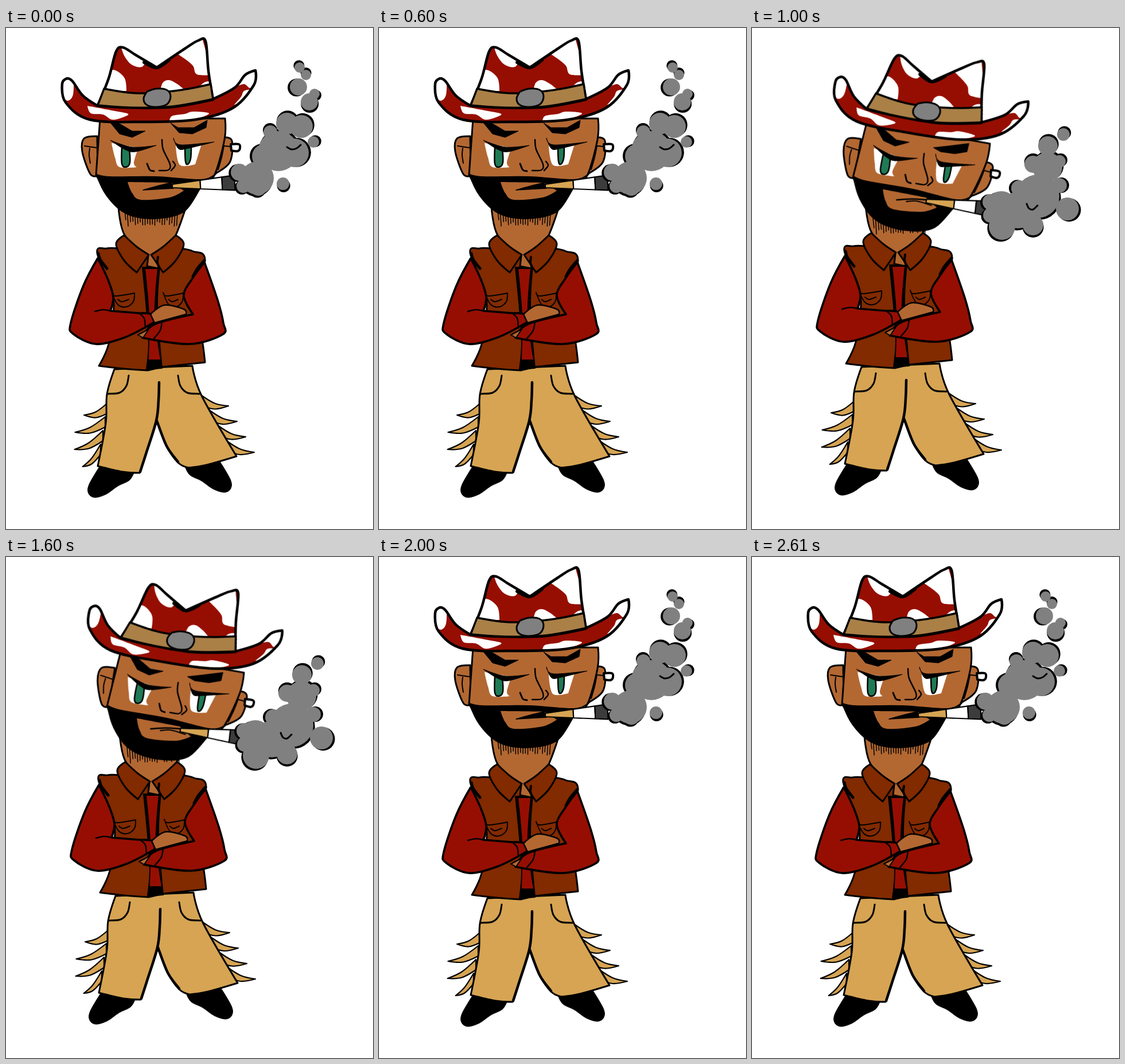
These frames come from a looping animation (640 by 875 pixels, 3010 ms). An HTML page:

```html
<!DOCTYPE html>
<html lang="en">
<head>
<meta charset="utf-8">
<title>Smoking cowboy</title>
<style>
  html, body { margin: 0; width: 100%; height: 100%; overflow: hidden; background: #fff; }
  svg { display: block; width: 100%; height: 100%; }
</style>
</head>
<body>
<svg id="stage" viewBox="0 0 640 875"></svg>
<script>
const NS = 'http://www.w3.org/2000/svg';
const INK = '#000', RED = '#960e02', VEST = '#822a00', SKIN = '#b36832', TAN = '#d6a453',
      BAND = '#aa8047', GREY = '#808080', GREEN = '#1f7a55', ASH = '#3c3c3c', WHITE = '#fff';

function add(parent, tag, attrs = {}) {
  const el = document.createElementNS(NS, tag);
  for (const k in attrs) el.setAttribute(k, attrs[k]);
  return parent.appendChild(el);
}

const group = (parent, transform = '') => add(parent, 'g', { transform });
const mirror = (parent, axis, dy = 0) => group(parent, `translate(${2 * axis} ${dy}) scale(-1 1)`);

// Smooth path through "x,y" points; a trailing "!" makes a sharp corner.
function curve(text, closed) {
  const p = text.trim().split(/\s+/).map(w => {
    const [x, y] = w.replace('!', '').split(',').map(Number);
    return { x, y, sharp: w.endsWith('!') };
  });
  const n = p.length;
  const at = i => closed ? p[(i + n) % n] : p[Math.max(0, Math.min(n - 1, i))];
  const slope = i => at(i).sharp ? [0, 0]
    : [(at(i + 1).x - at(i - 1).x) / 6, (at(i + 1).y - at(i - 1).y) / 6];
  let d = `M${p[0].x},${p[0].y}`;
  for (let i = 0; i < (closed ? n : n - 1); i++) {
    const a = at(i), b = at(i + 1), s = slope(i), t = slope(i + 1);
    d += `C${a.x + s[0]},${a.y + s[1]} ${b.x - t[0]},${b.y - t[1]} ${b.x},${b.y}`;
  }
  return d + (closed ? 'Z' : '');
}

const shape = (g, pts, fill, width = 0) => add(g, 'path', {
  d: curve(pts, true), fill, stroke: width ? INK : 'none', 'stroke-width': width, 'stroke-linejoin': 'round'
});
const line = (g, pts, width = 3) => add(g, 'path', {
  d: curve(pts, false), fill: 'none', stroke: INK, 'stroke-width': width,
  'stroke-linecap': 'round', 'stroke-linejoin': 'round'
});
const dot = (g, cx, cy, r, fill) => add(g, 'circle', { cx, cy, r, fill });

function random(seed) {
  return () => (seed = seed * 16807 % 2147483647) / 2147483647;
}

// A curved strand from the trouser seam to its tip.
function strand(g, x, y, tipX, tipY) {
  const midX = (x + tipX) / 2, midY = (y + tipY) / 2;
  shape(g, `${x},${y}! ${midX},${midY + 5} ${tipX},${tipY}! ${midX},${midY + 15} ${x},${y + 18}!`, TAN, 2.2);
}

function drawLegs(g) {
  for (const side of [g, mirror(g, 268, -9)])
    shape(side, '165,763! 145,797 144,813 155,820 175,814 195,800 215,790 223,777!', INK, 1);
  for (let i = 0; i < 4; i++) {
    strand(g, 177 - 4 * i, 655 + 24 * i, 136 - 23 * i + 7.4 * i * i, 676 + 30 * i);
    strand(g, 340 + 14 * i, 641 + 26 * i, 388 + 15 * i, 660 + 27 * i);
  }
  shape(g, `189,596! 325,590! 341,642 402,748! 350,763 318,768! 300,759 280,730
    263,686! 255,712 244,744 233,777! 203,775 160,765! 174,690 176,640`, TAN, 3);
  line(g, '267,619 266,650 262,686 244,744 234,775', 4.5);
  line(g, '263,686 280,730 300,758', 4.5);
  for (const side of [g, mirror(g, 257)]) line(side, '214,607 210,625 198,637 177,639');
}

function pocket(g, x, width) {
  const p = group(g, `translate(${x} 462) scale(${width / 40} 1)`);
  shape(p, '0,0! 7,6 40,1! 38,16 26,25 11,21', 'none', 2);
  line(p, '11,12 18,16 30,12', 2);
}

function drawTorso(g) {
  shape(g, '196,385! 175,385 159,393 187,470 180,548 162,590! 205,595 247,598! 272,592! 347,584! 342,545 330,490 347,405 326,390 305,385!', VEST, 3);
  shape(g, '238,418! 268,418! 264,490 272,594! 245,596! 249,550 245,490', INK, 2);
  shape(g, '243,421! 264,421! 259,500 269,579! 249,579! 250,500', RED);
  shape(g, '196,312! 207,362 248,398! 246,416! 266,420! 264,400! 292,370 314,312!', SKIN, 3);
  for (const side of [g, mirror(g, 251)])
    shape(side, '206,362! 192,377 206,406 228,427! 249,396! 228,382', VEST, 3);
  line(g, '265,400 264,410 267,418', 4);
  pocket(g, 184, 40);
  pocket(g, 274, 35);
}

function drawArms(g) {
  shape(g, '160,402! 135,450 113,515 117,534 157,552 208,540 258,514! 253,500 232,498! 182,494! 187,470 178,440', RED, 3.6);
  shape(g, '346,409! 369,475 379,515 378,535 320,552 238,541! 258,518 326,500! 310,467 326,436', RED, 3.6);
  shape(g, '230,536! 249,526! 239,541!', SKIN, 2);
  shape(g, '252,500! 276,484 310,491 314,500! 259,515!', SKIN, 2.5);
  line(g, '232,498 241,507 243,524', 2.5);
  line(g, '272,512 269,528 258,542', 2.5);
  line(g, '155,495 169,492 182,494', 2.5);
  line(g, '161,394 164,404 176,420', 5);
  line(g, '346,406 334,420 326,434', 5);
}

function drawStubble(g) {
  const rnd = random(7);
  for (let x = 207; x < 300; x += 4.4)
    line(g, `${x},318 ${x + (253 - x) * .04},${335 + rnd() * 12}`, 1.5);
}

function drawFace(g) {
  shape(g, '159,189! 136,193 133,216 147,255 160,258!', SKIN, 3);
  line(g, '137,206 157,209', 2);
  line(g, '146,210 145,222 147,236', 2);
  shape(g, '380,191! 394,197 390,235 360,257!', SKIN, 3);
  shape(g, '164,158! 157,257! 205,320 255,330 310,318 342,272! 363,258 381,195 382,158!', SKIN, 3);
  line(g, '380,206 376,226 370,247', 2);
  line(g, '381,206 391,207', 2);
  shape(g, '392,203! 406,203 408,210 404,215 393,214!', WHITE, 4);
  shape(g, '157,255! 180,260 262,260 340,265 366,255! 342,270! 311,320 255,333 206,322 175,292', INK, 2);
  shape(g, '212,269! 288,270! 310,284! 285,296 235,300 220,288', SKIN);

  shape(g, '184,201! 231,209! 223,235 228,243! 198,243 190,226', WHITE);
  shape(g, '296,205! 341,203! 330,238! 303,239', WHITE);
  shape(g, '202,208! 215,210! 216,235 209,243 202,237', GREEN, 2.5);
  shape(g, '312,207! 323,207! 322,228 317,238 313,233', GREEN, 2.5);
  shape(g, '182,196! 220,208 262,205! 226,216 207,212', INK, 1);
  shape(g, '292,192! 304,204 363,199! 318,210 301,211', INK, 1);

  line(g, '246,237 251,248 258,250', 3);
  line(g, '272,195 274,212 286,238 283,248 267,249', 2.5);
  line(g, '291,233 295,240 288,249', 2.5);
  shape(g, '180,163! 198,167! 220,180! 243,180! 220,191! 198,185!', INK, 1);
}

function drawRest(g) {
  shape(g, '287,166! 300,174! 328,174! 351,161! 349,174! 325,185! 302,183!', INK, 1);
  shape(g, '239,283! 264,276 288,270! 292,280!', INK, 1.5);
}

function drawTilt(g) {
  shape(g, '286,182! 310,175! 346,164! 345,179! 325,186! 300,187!', INK, 1);
  line(g, '239,283 264,277 288,274', 2.5);
  line(g, '256,283 274,279 300,282', 2);
}

// A cone from the lips outward, cut into filter, paper and ash.
function drawCigar(g) {
  const c = group(g, 'translate(290 276) rotate(-3)');
  const cut = (from, to, fill) => {
    const [a, b] = [from, to].map(x => 3 + x * .093);
    shape(c, `${from},${-a}! ${to},${-b}! ${to},${b}! ${from},${a}!`, fill, 2.2);
  };
  cut(0, 49, TAN);
  cut(49, 87, WHITE);
  cut(87, 109, ASH);
}

// Red felt with white patches cut off at the outline.
function felt(g, id, outline, patches) {
  const clip = add(g, 'clipPath', { id });
  shape(clip, outline, INK);
  shape(g, outline, RED);
  const inside = add(g, 'g', { 'clip-path': `url(#${id})` });
  patches.forEach(p => shape(inside, p, WHITE));
  shape(g, outline, 'none', 4.5);
}

function drawHat(g) {
  felt(g, 'brim', `107,88! 98,97 104,130 146,160 240,164 330,160 395,140 432,100 435,74!
    417,82 399,104 361,124! 290,137 220,139 160,136! 134,118 116,93`, [
    '95,85! 118,85! 117,116 108,127 95,120!',
    '142,136! 190,145 213,150 204,156 185,160 169,151 148,149',
    '285,166! 289,154 312,150 326,146 354,149 330,159',
    '440,70! 410,75! 398,104! 415,98 426,105 438,98!',
    '429,107! 415,110 410,120 398,134! 425,128!'
  ]);
  felt(g, 'crown', '160,135! 179,88 192,41 204,34 226,47 263,69! 312,36 335,22 348,23 353,75 361,125! 290,138 220,139', [
    '200,30! 245,55! 237,68 219,64 206,48',
    '297,44! 340,10! 360,82! 333,81 326,66 312,54',
    '175,74! 191,74 207,88 210,110! 165,110!',
    '269,112! 273,96 284,91 299,98 311,108!',
    '362,92! 346,95 339,104 362,104!'
  ]);
  shape(g, '171,106! 230,114 300,109 357,98! 361,124! 290,137 220,139 160,135!', BAND, 3.5);
  shape(g, '246,111! 262,106 280,108 287,119 281,133 262,138 245,134 240,123', GREY, 3);
  line(g, '241,60 263,69 284,56', 6);
}

// Grey puffs, each with an ink crescent on the side away from the cloud's centre.
function cloud(g, puffs) {
  const mean = k => puffs.reduce((sum, p) => sum + p[k], 0) / puffs.length;
  const cx = mean(0), cy = mean(1);
  for (const [x, y, r] of puffs) {
    const a = Math.atan2(y - cy, x - cx);
    dot(g, x + 3.5 * Math.cos(a), y + 3.5 * Math.sin(a), r + .5, INK);
  }
  puffs.forEach(([x, y, r]) => dot(g, x, y, r, GREY));
}

function drawRestSmoke(g) {
  cloud(g, [[490, 167, 19], [461, 182, 12], [515, 172, 20], [536, 199, 10], [503, 218, 25], [450, 224, 21],
    [438, 262, 29], [407, 252, 15], [414, 276, 12], [440, 279, 14], [483, 272, 11], [475, 215, 35]]);
  cloud(g, [[512, 69, 9], [523, 82, 9], [510, 103, 15], [538, 115, 9], [529, 129, 15]]);
  line(g, '490,208 498,212 507,210 514,204');
}

function drawTiltSmoke(g) {
  cloud(g, [[543, 186, 11], [516, 206, 17], [490, 238, 15], [536, 233, 11], [515, 243, 26], [466, 280, 14],
    [536, 275, 13], [435, 312, 27], [416, 304, 14], [416, 327, 13], [436, 347, 23], [490, 344, 18],
    [498, 294, 38], [550, 316, 20], [464, 318, 32]]);
  line(g, '479,307 483,315 490,317 498,310');
}

const stage = document.getElementById('stage');
const [body, stubble, head, restSmoke, tiltSmoke] = Array.from({ length: 5 }, () => group(stage));
drawLegs(body);
drawTorso(body);
drawArms(body);
drawStubble(stubble);
drawFace(head);
const restFace = group(head), tiltFace = group(head);
drawRest(restFace);
drawTilt(tiltFace);
drawCigar(head);
drawHat(head);
drawRestSmoke(restSmoke);
drawTiltSmoke(tiltSmoke);

// Two held poses: rest, tilt, rest.
function hold(el, prop, rest, tilt) {
  const key = (value, ms) => ({ [prop]: value, offset: ms / 3010, easing: 'step-end' });
  el.animate([key(rest, 0), key(tilt, 1000), key(rest, 2000), key(rest, 3010)],
    { duration: 3010, iterations: Infinity });
}

const HOME = 'translate(0px, 0px)';
hold(body, 'transform', HOME, 'translate(2px, -4px)');
hold(stubble, 'transform', HOME, 'translate(4px, 14px)');
hold(head, 'transform', HOME, 'translate(305px, 146px) rotate(10deg) translate(-264px, -122px)');
for (const el of [restFace, restSmoke]) hold(el, 'visibility', 'visible', 'hidden');
for (const el of [tiltFace, tiltSmoke]) hold(el, 'visibility', 'hidden', 'visible');
</script>
</body>
</html>
```
